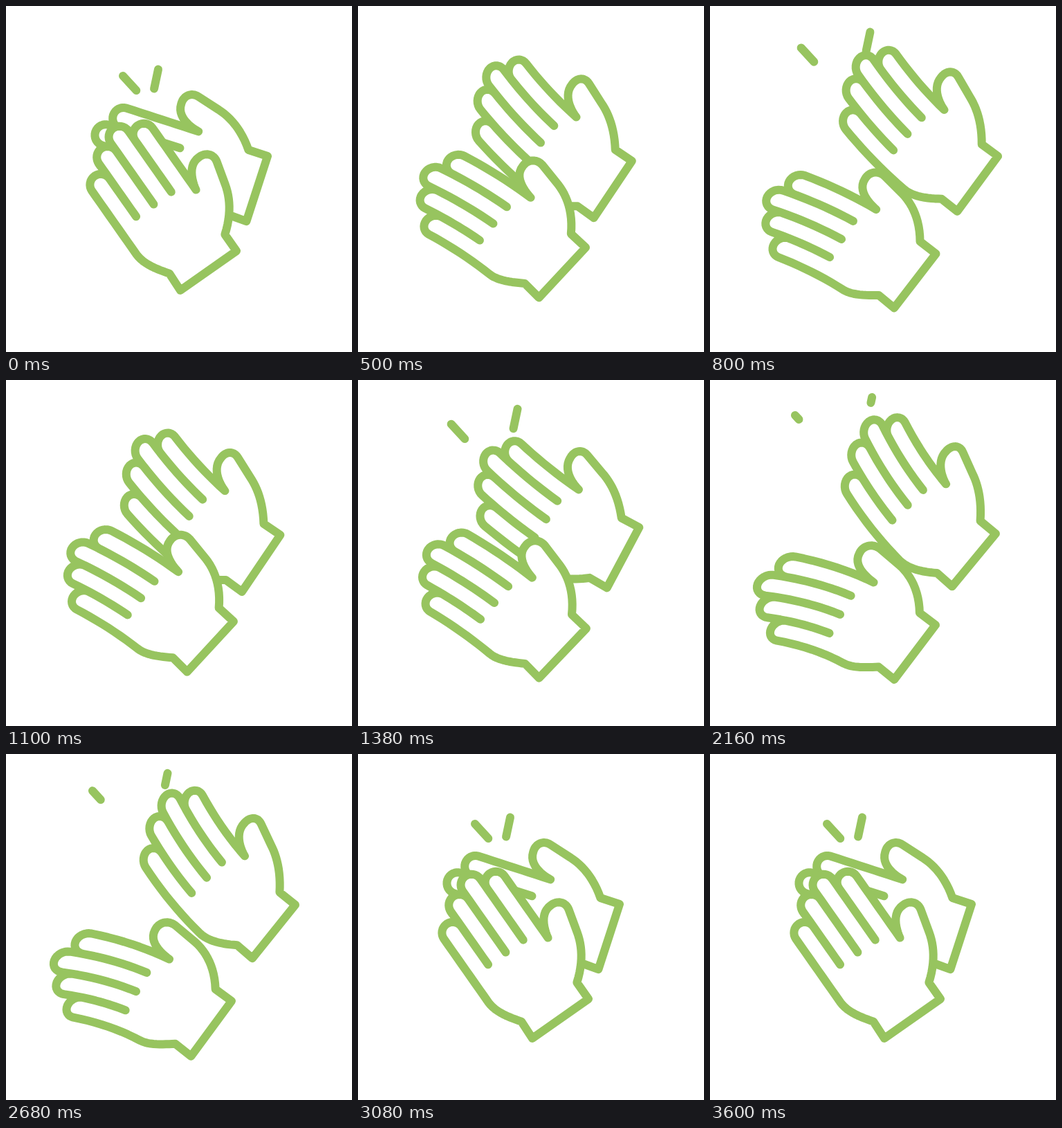
An HTML page with a canvas that plays this animation: 500 px wide and 500 px high, repeating every 3620 ms.

```html
<!DOCTYPE html>
<html lang="en">
<head>
<meta charset="utf-8">
<title>Clapping hands</title>
<style>
html, body { margin: 0; width: 100%; height: 100%; overflow: hidden; background: #fff; }
canvas { display: block; width: 500px; height: 500px; }
</style>
</head>
<body>
<canvas id="stage" width="500" height="500"></canvas>
<script>
const ctx = document.getElementById('stage').getContext('2d');
const GREEN = '#97c45f';
const LOOP = 3620, CLAP = 604, CLAPS = 5;

// time | lower hand: cuff x, y, angle, bend | upper hand: same | spark travel, length
const KEYS = [
  [60, 333, 354, -35.1, 0, 378, 217, -72, 0, 0, 28.5],
  [172, 330, 359, -46.2, 1.3, 406, 213, -62.1, -1.35, 50.5, 29],
  [196, 326.5, 358, -52.4, 1.65, 416, 217, -53.7, -1.64, 55, 27.6],
  [264, 326, 357, -53.7, 2.55, 418, 218, -51.2, -2.1, 65, 17.6],
  [348, 326, 354, -52.9, 2.7, 413, 222, -50.4, -2.15, 68, 8.2],
  [500, 329, 349, -47.1, 1.5, 396, 224, -56.1, -1.68, 69, -9],
  [CLAP, 333, 354, -35.1, 0, 378, 217, -72, 0, 69, -9]
];

const slope = (i, col) =>
  (KEYS[i + 1][col] - KEYS[i][col]) / (KEYS[i + 1][0] - KEYS[i][0]);

// Monotone tangent: flat at the ends and at turning points
function tangent(i, col) {
  if (i === 0 || i === KEYS.length - 1) return 0;
  const a = slope(i - 1, col), b = slope(i, col);
  return a * b > 0 ? 2 * a * b / (a + b) : 0;
}

function track(col, time) {
  if (time <= KEYS[0][0]) return KEYS[0][col];
  let i = 0;
  while (i < KEYS.length - 2 && time > KEYS[i + 1][0]) i++;
  const span = KEYS[i + 1][0] - KEYS[i][0];
  const p = (time - KEYS[i][0]) / span, q = 1 - p;
  return KEYS[i][col] * q * q * (1 + 2 * p) + KEYS[i + 1][col] * p * p * (3 - 2 * p)
    + span * p * q * (q * tangent(i, col) - p * tangent(i + 1, col));
}

// Hand outline in its own space: x across the palm, y towards the fingertips
function buildHand() {
  const pts = [];
  const add = (x, y) => pts.push([x, y]);
  const line = (x, y0, y1) => {
    for (let i = 0; i <= 10; i++) add(x, y0 + (y1 - y0) * i / 10);
  };
  const curve = (...c) => {
    const [x0, y0] = pts[pts.length - 1];
    for (let i = 1; i <= 12; i++) {
      const t = i / 12, s = 1 - t;
      const mix = (a, b, d, e) => a * s * s * s + 3 * b * s * s * t + 3 * d * s * t * t + e * t * t * t;
      add(mix(x0, c[0], c[2], c[4]), mix(y0, c[1], c[3], c[5]));
    }
  };
  const WIDTH = 31, R = WIDTH / 2;

  add(22, -124);
  add(23, -95);
  curve(12, -80, 0, -62, 0, -45);
  [67, 94, 108, 91].forEach((tip, f) => {
    const x = f * WIDTH;
    line(x, f ? 0 : -45, tip);
    for (let i = 1; i < 16; i++) {
      const a = Math.PI * (1 - i / 16);
      add(x + R + R * Math.cos(a), tip + R * Math.sin(a));
    }
    line(x + WIDTH, tip, f === 3 ? -18 : 0);
  });
  curve(127, -2, 136, 18, 154, 18);
  curve(166, 19, 175, 10, 172, -2);
  add(163, -36);
  curve(158, -55, 146, -76, 121, -95);
  add(121, -124);
  return pts;
}

const HAND = buildHand();

function drawHand(x, y, degrees, bend) {
  const a = degrees * Math.PI / 180, c = Math.cos(a), s = Math.sin(a);
  const k = bend / 1000, spine = k > 0 ? 100 : 65;
  ctx.beginPath();
  for (const [px, py] of HAND) {
    const h = Math.max(0, py + 95);
    const across = px - k * h * h / 2 - 121;
    const along = py + k * h * (px - spine) / 2 + 124;
    ctx.lineTo(x + across * c + along * s, y + across * s - along * c);
  }
  ctx.closePath();
  ctx.fill();
  ctx.stroke();
}

function drawSpark(x, y, dx, dy, travel, length) {
  const d = Math.hypot(dx, dy), ux = dx / d, uy = dy / d;
  ctx.beginPath();
  ctx.moveTo(x + ux * travel, y + uy * travel);
  ctx.lineTo(x + ux * (travel - length), y + uy * (travel - length));
  ctx.stroke();
}

function draw(time) {
  const phase = time < CLAP * CLAPS ? time % CLAP : 0;
  const [lx, ly, la, lb, ux, uy, ua, ub, travel, length] =
    KEYS[0].slice(1).map((_, i) => track(i + 1, phase));

  ctx.fillStyle = '#fff';
  ctx.fillRect(0, 0, 500, 500);
  ctx.strokeStyle = GREEN;
  ctx.lineWidth = 12;
  ctx.lineCap = ctx.lineJoin = 'round';

  if (length > 0) {
    drawSpark(169, 101, -46, -50, travel, length);
    drawSpark(220, 91.5, 14, -66, travel, length);
  }
  drawHand(ux, uy, ua, ub);
  drawHand(lx, ly, la, lb);
}

const start = performance.now();
function frame() {
  draw((performance.now() - start) % LOOP);
  requestAnimationFrame(frame);
}
frame();
</script>
</body>
</html>
```
